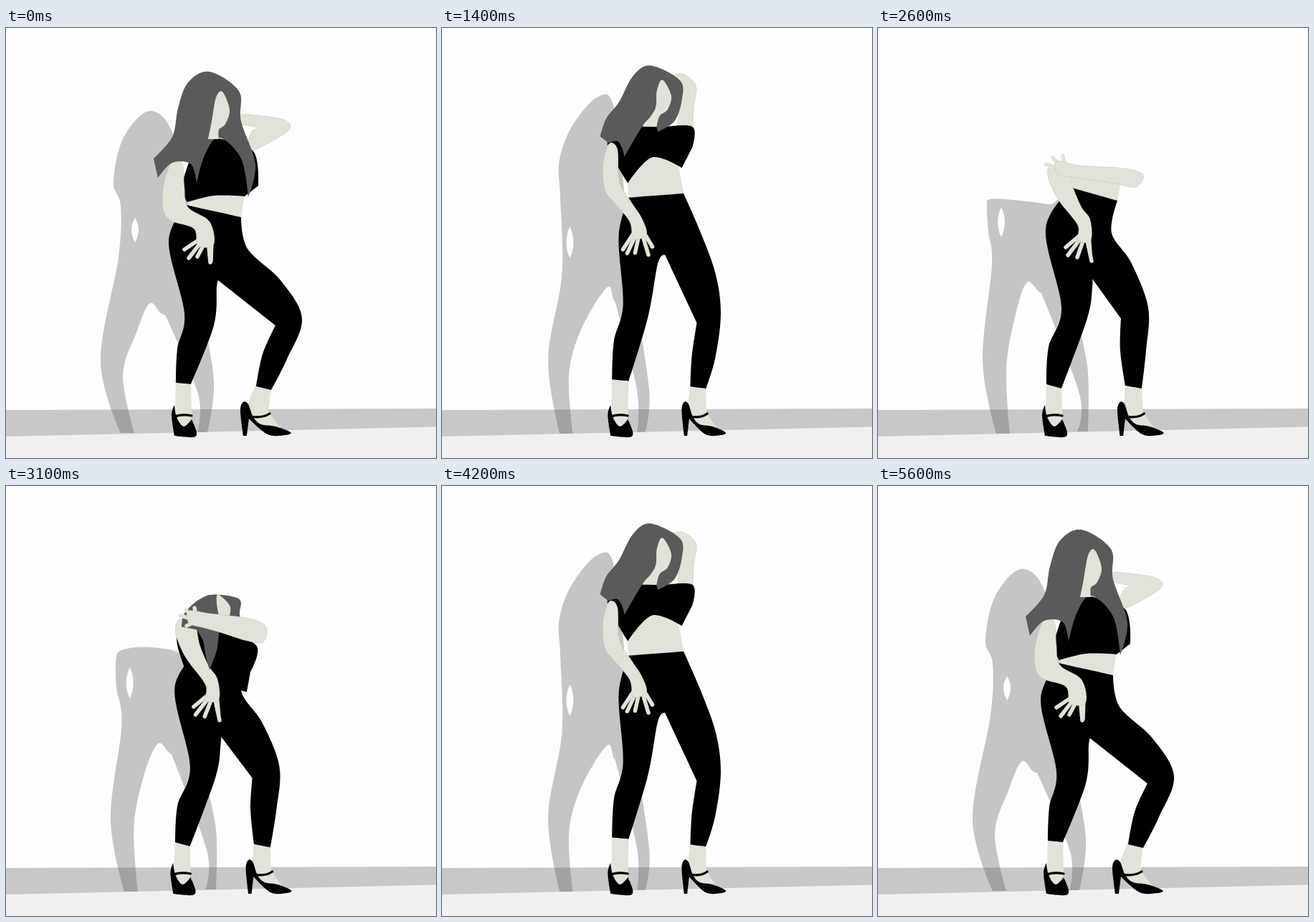
Animation of 600 by 600 pixels, one loop 5700 ms. Source, as an HTML page with a canvas:

```html
<!DOCTYPE html>
<html lang="en">
<head>
<meta charset="utf-8">
<title>Dancer</title>
<style>
html, body { margin: 0; width: 100%; height: 100%; overflow: hidden; background: #fdfdfd; }
canvas { display: block; width: 100vw; height: 100vh; }
</style>
</head>
<body>
<canvas id="stage" width="600" height="600"></canvas>
<script>
const ctx = document.getElementById('stage').getContext('2d');
const SKIN = '#e2e2d8', HAIR = '#5a5a59', BLACK = '#010101';
const now = { from: 0, to: 1, u: 0, lift: 0 };

// One point list per key pose. Three poses: the last one just sinks further.
function poses(...lists) {
  if (lists.length < 4) lists.push(lists[2].map((v, i) => i % 2 ? v + 60 : v));
  return lists;
}

const hips = poses(
  [252,247, 328,264, 337,308, 383,352, 413,405, 392,462, 370,505, 349,500, 358,455, 376,415, 296,352],
  [262,233, 341,228, 365,283, 380,345, 381,400, 375,462, 366,501, 344,500, 344,460, 349,411, 313,311],
  [257,270, 327,262, 345,298, 385,350, 409,405, 397,462, 374,511, 353,504, 360,460, 372,422, 307,349],
  [271,223, 334,241, 326,286, 353,327, 377,390, 374,450, 368,503, 345,499, 338,450, 339,405, 299,350]);

const leftLeg = poses(
  [294,362, 290,415, 258,497, 237,495, 239,448, 249,398, 227,298],
  [301,322, 284,405, 260,491, 235,489, 237,435, 249,385, 248,295],
  [302,360, 296,410, 262,500, 243,498, 247,450, 262,400, 243,298],
  [299,362, 292,405, 256,503, 235,497, 238,445, 256,390, 234,280]);

const belly = poses(
  [253,243, 295,225, 334,222, 328,266, 253,246],
  [256,212, 295,165, 331,185, 342,231, 262,236],
  [262,224, 295,220, 325,224, 327,264, 258,271],
  [268,200, 303,204, 339,212, 334,243, 271,225]);

const shirt = poses(
  [281,154, 297,154, 345,172, 352,220, 333,235, 290,234, 253,243, 246,220, 262,172],
  [266,144, 304,145, 349,137, 353,161, 334,190, 292,173, 259,221, 228,174, 246,159],
  [272,150, 305,152, 350,172, 341,208, 336,236, 296,228, 260,231, 239,170, 245,143]);

const hair = poses(
  [284,61, 325,88, 328,130, 348,190, 338,236, 328,182, 297,153, 277,178,
   266,217, 258,190, 232,188, 212,209, 206,182, 232,152, 240,112, 254,76],
  [292,49, 335,75, 338,105, 324,138, 297,157, 296,143, 305,119, 278,128,
   243,181, 240,171, 232,167, 219,177, 211,166, 222,138, 243,112, 265,66],
  [290,100, 325,106, 326,125, 325,143, 312,146, 305,139, 298,150, 294,178,
   284,205, 279,187, 275,165, 266,149, 245,145, 247,130, 256,118, 271,106]);

const face = poses(
  [302,89, 312,114, 306,134, 297,142, 297,155, 282,155, 287,130, 293,97],
  [312,76, 323,100, 316,121, 302,129, 296,145, 273,145, 297,117, 302,93],
  [296,100, 312,115, 312,130, 308,140, 308,152, 296,152, 298,138, 294,112]);

const nearArm = poses(
  [232,186, 220,218, 219,252, 230,269, 262,280, 268,304, 290,302, 284,270, 254,250, 249,222, 246,189],
  [227,178, 221,205, 222,238, 235,250, 256,270, 262,294, 281,288, 274,266, 260,248, 242,222, 238,186],
  [247,151, 233,182, 240,222, 254,252, 276,292, 280,315, 297,308, 290,284, 277,257, 262,222, 262,157],
  [240,193, 237,207, 245,228, 256,246, 279,276, 278,297, 297,296, 296,267, 284,250, 272,222, 262,192]);

const tips = poses(
  [249,309, 255,321, 267,319, 285,327, 286,325],
  [249,312, 257,315, 268,314, 284,315, 291,298],
  [261,320, 262,331, 273,331, 298,338, 300,342],
  [262,306, 265,317, 278,320, 298,325, 296,314]);

const farArm = poses(
  [326,121, 352,122, 390,129, 393,144, 344,171, 338,158, 343,144, 350,139, 326,133],
  [332,70, 350,68, 369,80, 363,108, 346,150, 328,133, 338,112, 343,93, 334,88],
  [284,104, 302,93, 318,120, 322,148, 350,194, 335,203, 311,165, 300,135, 287,116],
  [250,186, 282,192, 345,196, 370,205, 360,222, 335,218, 300,212, 270,208, 250,204]);

const shade = poses(
  [199,116, 163,155, 150,216, 160,248, 157,320, 132,465, 160,565, 179,565, 163,485, 182,425, 201,384, 222,400, 232,145],
  [216,96, 178,138, 164,193, 169,235, 164,345, 149,465, 164,566, 182,566, 178,485, 195,418, 228,358, 239,380, 240,112],
  [217,134, 187,172, 162,200, 155,260, 176,355, 146,465, 165,566, 184,566, 175,485, 193,435, 236,386, 248,400, 240,142],
  [190,240, 156,239, 152,250, 154,285, 159,330, 146,465, 165,566, 184,566, 179,475, 192,400, 208,355, 228,370, 238,246]);

const shadeLeg = poses(
  [268,510, 267,564, 281,564, 290,490],
  [270,505, 270,564, 280,564, 287,510],
  [277,505, 278,563, 293,563, 295,500],
  [281,510, 278,563, 293,563, 292,470]);

// centre and half height of the gap inside the shadow's arm
const gap = poses([180,282,17], [179,307,20], [177,298,28], [172,271,21]);
// left shoe offset, right heel, right toe
const shoes = poses([0,327,397], [0,333,395], [1,338,397], [-2,334,398]);

const mix = lists => lists[now.from].map((v, i) => v + (lists[now.to][i] - v) * now.u);
const raise = y => y - now.lift * Math.max(0, (540 - y) / 490);

function points(lists) {
  const flat = mix(lists), out = [];
  for (let i = 0; i < flat.length; i += 2) out.push([flat[i], raise(flat[i + 1])]);
  return out;
}

// Smooth closed curve through all points; listed indexes stay sharp.
function trace(pts, corners) {
  const n = pts.length, at = i => pts[(i + n) % n];
  const slope = (i, k) => corners.includes((i + n) % n) ? 0 : (at(i + 1)[k] - at(i - 1)[k]) / 6;
  ctx.moveTo(...pts[0]);
  for (let i = 0; i < n; i++) {
    const a = at(i), b = at(i + 1);
    ctx.bezierCurveTo(a[0] + slope(i, 0), a[1] + slope(i, 1),
      b[0] - slope(i + 1, 0), b[1] - slope(i + 1, 1), ...b);
  }
  ctx.closePath();
}

function blob(pts, color, corners = []) {
  ctx.beginPath();
  trace(pts, corners);
  ctx.fillStyle = color;
  ctx.fill();
}

function poly(pts, color) {
  ctx.beginPath();
  pts.forEach(p => ctx.lineTo(...p));
  ctx.fillStyle = color;
  ctx.fill();
}

function strap(a, c, b) {
  ctx.beginPath();
  ctx.moveTo(...a);
  ctx.quadraticCurveTo(...c, ...b);
  ctx.strokeStyle = BLACK;
  ctx.lineWidth = 3.2;
  ctx.stroke();
}

function finger(a, b) {
  ctx.beginPath();
  ctx.moveTo(...a);
  ctx.lineTo(...b);
  ctx.strokeStyle = SKIN;
  ctx.lineWidth = 5.5;
  ctx.lineCap = 'round';
  ctx.stroke();
}

function drawLimb(pts) {
  blob(pts, SKIN);
  ctx.strokeStyle = 'rgba(120,120,105,.3)';
  ctx.lineWidth = .6;
  ctx.stroke();
}

const between = (a, b, t) => [a[0] + (b[0] - a[0]) * t, a[1] + (b[1] - a[1]) * t];

function drawNearArm() {
  const arm = points(nearArm), palm = between(arm[4], arm[5], .6);
  points(tips).forEach((tip, i) => finger(between(palm, arm[6], .15 + i * .18), tip));
  drawLimb(arm);
}

function drawFarArm(open) {
  const arm = points(farArm), [x, y] = between(arm[0], arm[7], .6);
  const spread = (dx, dy) => finger([x, y], [x + dx * open, y + dy * open]);
  if (open > 0) {
    spread(-27, -9);
    spread(-18, -18);
    spread(-4, -21);
    spread(-17, 8);
  }
  drawLimb(arm);
}

function drawShadow() {
  const body = points(shade), leg = points(shadeLeg);
  leg.unshift(body[11]);
  leg.push([270, 380]);
  body.splice(12, 0, [262, 380], [256, 250]);
  ctx.beginPath();
  trace(body, [6, 7]);
  trace(leg, [0, 2, 3, 5]);
  const [x, y, ry] = mix(gap), cy = raise(y);
  ctx.moveTo(x, cy - ry);
  ctx.quadraticCurveTo(x + 10, cy, x, cy + ry);
  ctx.quadraticCurveTo(x - 10, cy, x, cy - ry);
  ctx.fillStyle = 'rgba(90,90,90,.34)';
  ctx.fill();
}

function drawFeet(pants) {
  const [dx, heel, toe] = mix(shoes);
  const left = (x, y) => [x + dx, y];
  const right = (x, y) => [heel + (x - 327) * (toe - heel) / 70, y];
  const up = p => [p[0], p[1] - 4];

  poly([up(pants[14]), up(pants[13]), left(259, 543), left(258, 558), left(243, 558), left(236, 532)], SKIN);
  blob([left(235, 526), left(238, 543), left(248, 556), left(259, 546), left(266, 564),
    left(261, 571), left(235, 569), left(231, 540)], BLACK, [0, 3, 6]);
  strap(left(234, 543), left(244, 538), left(259, 541));

  poly([up(pants[7]), up(pants[6]), right(366, 536), right(383, 558), right(354, 558), right(337, 525)], SKIN);
  blob([right(331, 522), right(338, 525), right(345, 543), right(356, 553), right(376, 556), right(397, 564),
    right(390, 568), right(365, 567), right(339, 545), right(336, 569), right(331, 569), right(327, 534)],
    BLACK, [8, 9, 10]);
  strap(right(341, 542), right(357, 545), right(368, 538));
}

function setPose(k) {
  const set = (from, u, lift) => Object.assign(now, { from, to: from + 1, u, lift });
  if (k <= 9) set(0, (k / 9) ** 2, 0);
  else if (k <= 12) set(1, 0, 16 * (k - 9) / 3);
  else if (k <= 19) set(1, (k - 12) / 7, 16 * (19 - k) / 7);
  else set(2, Math.min(1, (k - 19) / 7), 0);
}

function render(ms) {
  const step = Math.floor(ms % 5700 / 100);
  const k = 28 - Math.abs(28 - step);   // the dance runs forward, then back
  setPose(k);

  ctx.fillStyle = '#fdfdfd';
  ctx.fillRect(0, 0, 600, 600);
  poly([[0, 550], [600, 550], [600, 600], [0, 600]], '#f0f0f0');
  poly([[0, 533], [600, 531], [600, 556.5], [0, 570]], '#c8c8c8');

  const pants = [...points(hips), ...points(leftLeg)];
  const armInFront = k >= 16, folded = k >= 26;
  drawShadow();
  drawFeet(pants);
  if (!armInFront) drawFarArm(0);
  blob(points(belly), SKIN, [0, 2, 3, 4]);
  blob(pants, BLACK, [0, 1, 6, 7, 9, 10, 13, 14]);
  if (!folded) blob(points(shirt), BLACK, [3, 4, 6]);
  drawNearArm();
  if (!folded) {
    blob(points(hair), HAIR, [4, 8, 11, 12]);
    blob(points(face), SKIN, [4, 5]);
  }
  if (armInFront) drawFarArm(now.from === 2 ? now.u : 0);
}

const start = performance.now();
function tick() {
  render(performance.now() - start);
  requestAnimationFrame(tick);
}
tick();
</script>
</body>
</html>
```
